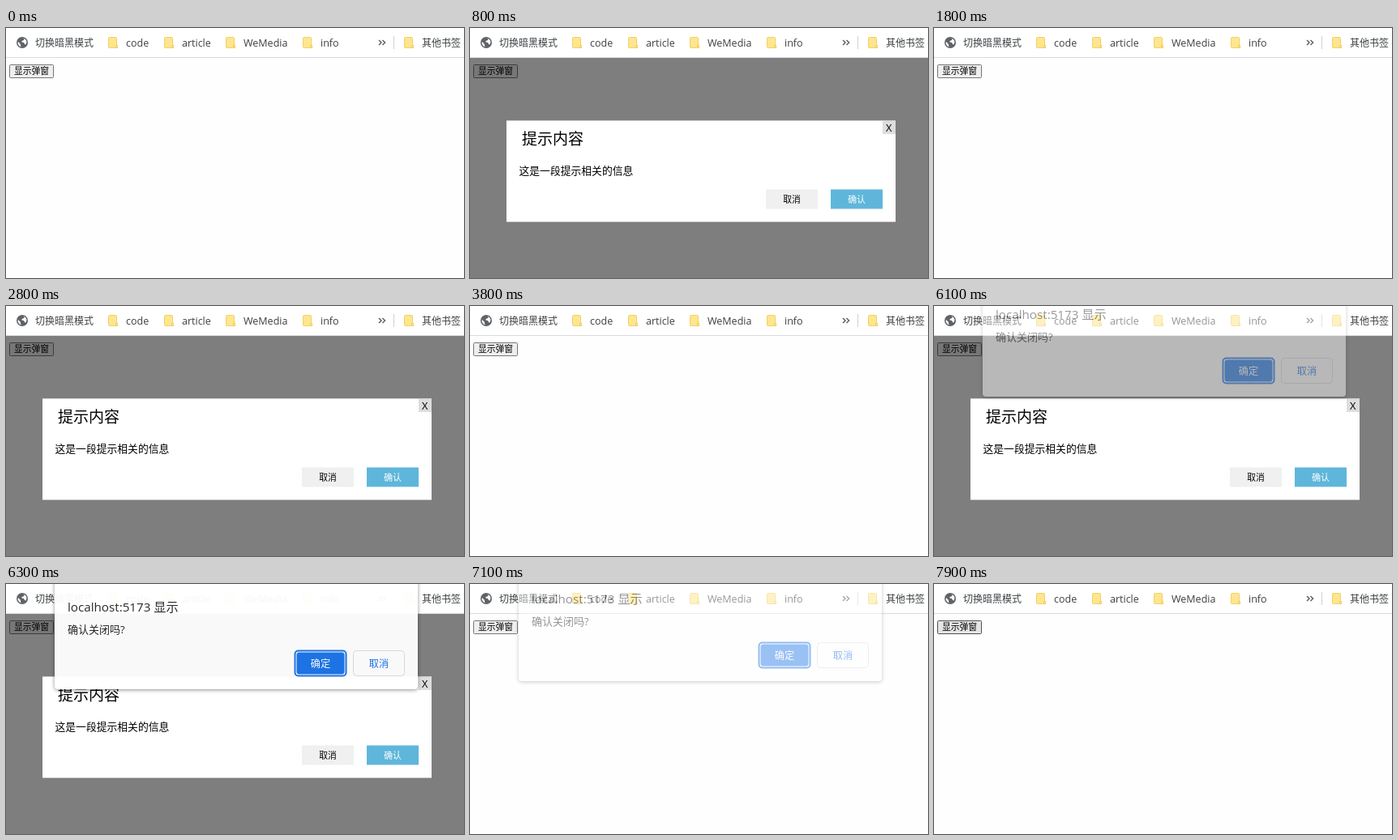
An HTML page with a canvas for the animation above (8000 ms loop, 565 by 309 pixels).

```html
<!DOCTYPE html>
<html lang="zh-CN">
<head>
<meta charset="utf-8">
<title>弹窗演示</title>
<style>
  html, body { margin: 0; width: 100%; height: 100%; overflow: hidden; background: #fff; }
  canvas { display: block; width: 565px; height: 309px; }
</style>
</head>
<body>
<canvas id="stage" width="565" height="309"></canvas>
<script>
const ctx = document.getElementById('stage').getContext('2d');
const LOOP = 8000;
const FONT = '"Open Sans", "Noto Sans CJK SC", "Noto Sans CJK", sans-serif';

function rect(x, y, w, h, color) {
  ctx.fillStyle = color;
  ctx.fillRect(x, y, w, h);
}

function roundRect(x, y, w, h, r, fill, stroke, lineWidth = 1) {
  ctx.beginPath();
  ctx.roundRect(x, y, w, h, r);
  if (fill) { ctx.fillStyle = fill; ctx.fill(); }
  if (stroke) { ctx.strokeStyle = stroke; ctx.lineWidth = lineWidth; ctx.stroke(); }
}

// Text is placed by its baseline.
function text(str, x, y, size, color, align = 'left', weight = 400) {
  ctx.font = `${weight} ${size}px ${FONT}`;
  ctx.textAlign = align;
  ctx.fillStyle = color;
  ctx.fillText(str, x, y);
}

function polygon(points, color) {
  ctx.fillStyle = color;
  ctx.beginPath();
  points.forEach(([x, y]) => ctx.lineTo(x, y));
  ctx.fill();
}

function folder(x) {
  roundRect(x + 0.5, 11.5, 10, 13, 1, '#ffe68f', '#f3cf63');
  rect(x + 9, 21, 3, 4, '#f3cf63');
  rect(x + 10, 22, 1, 2, '#ffe68f');
}

function globe() {
  ctx.fillStyle = '#5f6368';
  ctx.beginPath();
  ctx.arc(20, 18, 7, 0, Math.PI * 2);
  ctx.fill();
  polygon([[15, 17], [18, 20], [18, 22], [19, 23.5], [16, 22], [14.5, 19]], '#fff');
  polygon([[21, 12.5], [23, 13], [22, 15], [19.5, 16], [19.5, 17.5], [22, 18],
           [23, 20], [24.5, 20.5], [25.5, 17], [24, 14]], '#fff');
}

function toolbar() {
  rect(0, 0, 565, 36, '#fff');
  rect(0, 36, 565, 1, '#d9dadb');
  globe();
  text('切换暗黑模式', 36, 23, 12, '#3c4043');
  [[126, 'code'], [195, 'article'], [271, 'WeMedia'], [366, 'info']].forEach(([x, label]) => {
    folder(x);
    text(label, x + 22, 23, 12.5, '#3c4043');
  });
  ctx.strokeStyle = '#5f6368';
  ctx.lineWidth = 1.5;
  for (const x of [460, 464.5]) {
    ctx.beginPath();
    ctx.moveTo(x, 15);
    ctx.lineTo(x + 3, 18);
    ctx.lineTo(x, 21);
    ctx.stroke();
  }
  rect(478, 10, 1, 16, '#cfd1d4');
  folder(491);
  text('其他书签', 513, 23, 12, '#3c4043');
}

function page(hover) {
  rect(0, 37, 565, 272, '#fefefe');
  roundRect(4.5, 45.5, 54, 16, 1, hover ? '#e5e5e5' : '#efefef', hover ? '#4f4f4f' : '#767676');
  text('显示弹窗', 31.5, 57, 10.8, '#000', 'center');
}

function modal() {
  rect(0, 37, 565, 272, 'rgba(0,0,0,.5)');
  rect(45, 114.4, 480, 125.2, '#fff');
  text('提示内容', 64, 144, 19, '#000');
  text('这是一段提示相关的信息', 60.5, 181, 12.8, '#000');
  rect(509, 115, 16, 16, '#ddd');
  text('X', 516.7, 128, 12.8, '#000', 'center');
  rect(365, 199.5, 64, 24, '#f0f0f0');
  text('取消', 397, 216, 10.8, '#000', 'center');
  rect(445, 199.5, 64, 24, '#5fb6db');
  text('确认', 477, 216, 10.8, '#fff', 'center', 500);
}

// Drawn on its own layer so that it fades as a whole.
const layer = document.createElement('canvas');
layer.width = 565;
layer.height = 309;
const layerCtx = layer.getContext('2d');

function renderConfirm(c, hover) {
  c.clearRect(0, 0, 565, 309);
  c.save();
  c.shadowColor = 'rgba(0,0,0,.45)';
  c.shadowBlur = 5;
  c.shadowOffsetY = 1;
  c.fillStyle = '#fff';
  c.beginPath();
  c.roundRect(60, -30, 448, 160, 4);
  c.fill();
  c.restore();
  const put = (str, x, y, size, color, align = 'left') => {
    c.font = `400 ${size}px ${FONT}`;
    c.textAlign = align;
    c.fillStyle = color;
    c.fillText(str, x, y);
  };
  const box = (x, y, w, h, r, fill, stroke, width) => {
    c.beginPath();
    c.roundRect(x, y, w, h, r);
    c.fillStyle = fill;
    c.fill();
    c.strokeStyle = stroke;
    c.lineWidth = width;
    c.stroke();
  };
  put('localhost:5173 显示', 76, 34, 15.2, '#202124');
  put('确认关闭吗?', 76, 61, 13, '#202124');
  const blue = hover ? '#2b7de9' : '#1a73e8';
  box(356.5, 82.5, 63, 31, 4, '#fff', '#1a73e8', 2);
  box(359, 85, 58, 26, 2, blue, blue, 1);
  put('确定', 388, 103, 12.2, '#fff', 'center');
  box(428.5, 82.5, 63, 31, 4, '#fff', '#dadce0', 1);
  put('取消', 460, 103, 12.2, '#1a73e8', 'center');
}

function confirmBox({ alpha, dy }, hover) {
  renderConfirm(layerCtx, hover);
  ctx.globalAlpha = alpha;
  ctx.drawImage(layer, 0, dy);
  ctx.globalAlpha = 1;
}

const within = (t, spans) => spans.some(([from, to]) => t >= from && t < to);
const HOVERED = [[400, 800], [2400, 2800], [4500, 4900], [7900, 8000]];
const OPEN = [[700, 1800], [2700, 3800], [4800, 7000]];

function confirmPose(t) {
  if (t < 6100 || t >= 7300) return null;
  if (t < 6300) {
    const k = Math.floor((t - 6100) / 100);
    return { alpha: 0.45 + 0.4 * k, dy: -18 + 13 * k };
  }
  if (t < 7000) return { alpha: 0.96, dy: 0 };
  const k = Math.floor((t - 7000) / 100);
  return { alpha: 0.8 - 0.33 * k, dy: -3 - 7 * k };
}

function draw(t) {
  page(within(t, HOVERED));
  toolbar();
  if (within(t, OPEN)) modal();
  const pose = confirmPose(t);
  if (pose) confirmBox(pose, t >= 6800);
}

const start = performance.now();
function tick() {
  draw((performance.now() - start) % LOOP);
  requestAnimationFrame(tick);
}
tick();
</script>
</body>
</html>
```
